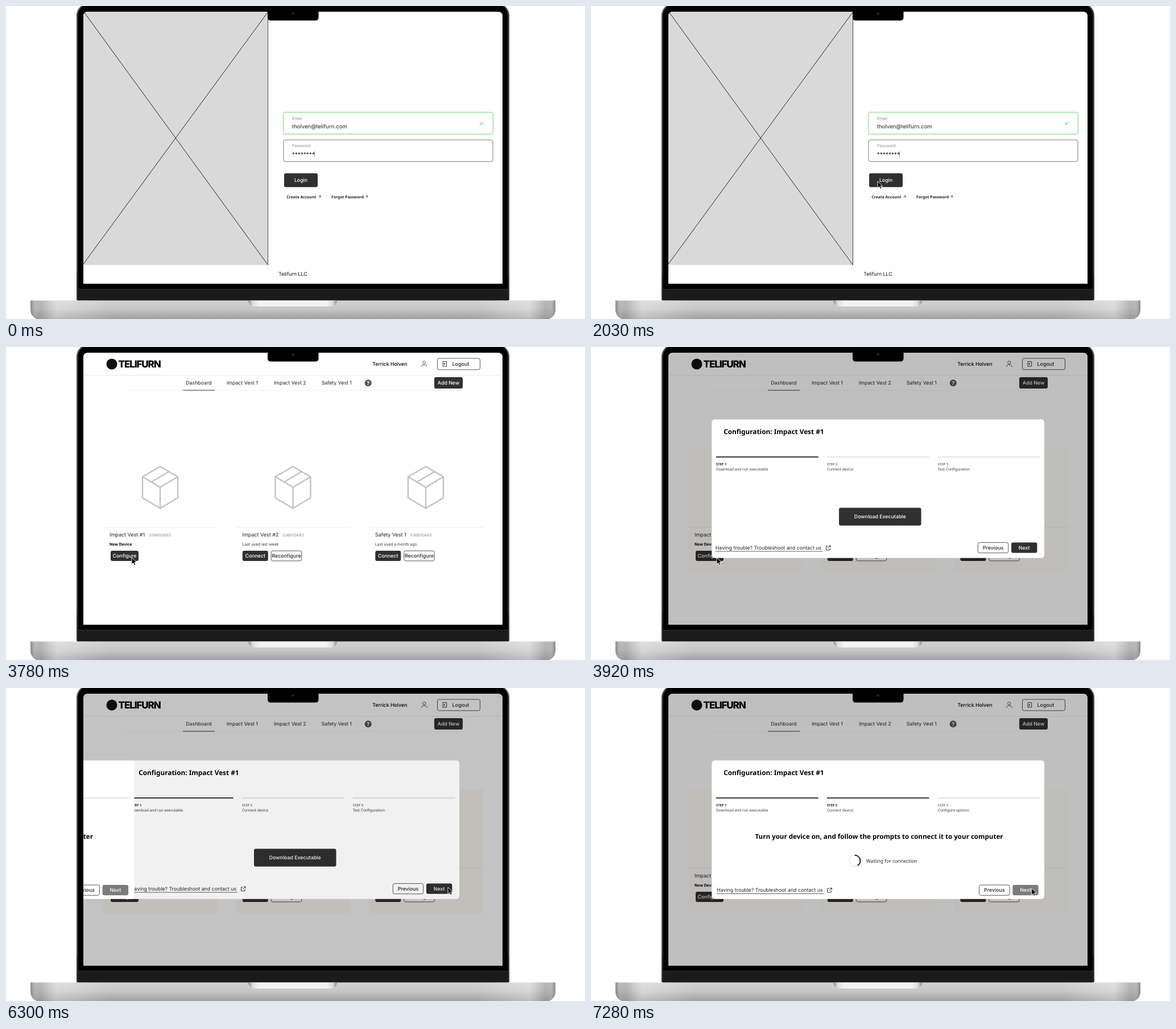
Animation, 1018 px wide and 550 px high, one loop 8000 ms. Source, as an HTML page:

```html
<!DOCTYPE html>
<html lang="en">
<head>
<meta charset="utf-8">
<title>Device setup</title>
<style>
  html, body { margin: 0; width: 100%; height: 100%; overflow: hidden; background: #fff; }
  svg { display: block; width: 100vw; height: 100vh; font-family: Inter, sans-serif; text-rendering: geometricPrecision; }
  .noto { font-family: "Noto Sans", sans-serif; }
</style>
</head>
<body>
<svg id="stage" viewBox="0 0 1018 550" xmlns="http://www.w3.org/2000/svg"></svg>
<script>
const INK = '#303030';
const LOOP = 8000, STEP = 70;

const rect = (x, y, x2, y2, fill, extra = '') =>
  `<rect x="${x}" y="${y}" width="${x2 - x}" height="${y2 - y}" fill="${fill}" ${extra}/>`;
const text = (x, y, str, size = 8.8, extra = '') =>
  `<text x="${x}" y="${y}" font-size="${size}" ${extra}>${str}</text>`;
const noto = (x, y, str, size, extra = '') => text(x, y, str, size, `class="noto" ${extra}`);
const path = (d, stroke = INK, width = 1, extra = '') =>
  `<path d="${d}" fill="none" stroke="${stroke}" stroke-width="${width}" ${extra}/>`;

function button(x, y, x2, y2, label, style = 'dark') {
  const outlined = style === 'outline';
  const fill = { dark: INK, outline: '#fff', off: '#7b7b7b' }[style];
  const edge = outlined ? 'stroke="#444" stroke-width=".9"' : '';
  return rect(x, y, x2, y2, fill, `rx="3" ${edge}`) +
    text((x + x2) / 2, (y + y2) / 2 + 3.2, label, 8.8,
      `text-anchor="middle" font-weight="500" fill="${outlined ? '#222' : '#fff'}"`);
}

function laptop() {
  return rect(124, -5, 885, 517.5, '#48484a', 'rx="22"') +
    rect(124, 470, 885, 517.5, '#3a3a3c', 'rx="2"') +
    rect(126.5, -3, 882.5, 517, '#000', 'rx="20"') +
    rect(126, 497.5, 883, 517.5, '#1b1b1c') +
    path('M126 497.5H883', '#3a3a3a', .8) +
    `<path d="M43 517.5H966V532Q966 552 942 552H67Q43 552 43 532Z" fill="url(#metal)"/>
     <path d="M43 517.5H966V532Q966 552 942 552H67Q43 552 43 532Z" fill="url(#sides)"/>
     <path d="M426 517.5H582Q581 528 569 528H439Q427 528 426 517.5Z" fill="url(#lip)"/>`;
}

function login() {
  const label = 'fill="#8a8a8a"', link = 'font-weight="600" fill="#222"';
  const arrow = x => path(`M${x} 337.2L${x + 3.6} 333.6M${x + .6} 333.6H${x + 3.6}V336.6`, '#333', .8);
  return rect(136, 10, 873, 488, '#fff') +
    rect(136, 10, 460.5, 455, '#d9d9d9') +
    path('M137 10.5L460.5 455M460.5 10.5L136 453.5', '#111', .9) +
    path('M460.5 10V455', '#333', .9) +
    rect(488, 187, 856, 225, '#fff', 'rx="3" stroke="#86dc86" filter="url(#glow)"') +
    text(503, 200, 'Email', 7, label) +
    text(502.8, 214.8, 'tholven@telifurn.com', 9.6, 'fill="#222"') +
    path('M833.2 206L835.2 208L839.2 203.8', '#55c05a', 1.1) +
    rect(488, 235.3, 856, 273.3, '#fff', 'rx="3" stroke="#7d7d7d"') +
    text(503, 248.4, 'Password', 7, label) +
    text(502.8, 263.6, '********', 9.6, 'fill="#222" font-weight="500"') +
    path('M542.3 255.5V264', '#333', .8) +
    button(489, 294, 548, 318.3, 'Login') +
    noto(493.2, 337.8, 'Create Account', 6.85, link) + arrow(549.5) +
    noto(572, 337.8, 'Forgot Password', 6.85, link) + arrow(632) +
    text(504.5, 473.7, 'Telifurn LLC', 8.9, 'text-anchor="middle" fill="#111"');
}

function card(x, name, status, isNew) {
  const box = x + 100, left = x + 11, tone = isNew ? 'font-weight="700"' : 'fill="#333"';
  const serial = { 171: 251.5, 404.5: 486, 638: 710.5 }[x];
  const cube = 'M0-36.5L31-18.5V18.5L0 37L-31 18.5V-18.5ZM-31-18.5L0 0L31-18.5M0 0V37M-15.5-9.2L15.5-27.5';
  const buttons = isNew
    ? button(184, 358, 233, 376, 'Configure')
    : button(left + .3, 358, left + 45.3, 376, 'Connect') +
      button(left + 50.8, 358.2, left + 104.2, 375.8, 'Reconfigure', 'outline');
  return rect(x, 178, x + 201, 395, '#fff', 'class="card"') +
    `<g transform="translate(${box} 246.5)">${path(cube, '#c2c2c2', 2.4, 'stroke-linejoin="round"')}</g>` +
    path(`M${x} 317H${x + 201}`, '#ececec') +
    text(left, 333, name, 9, 'fill="#222"') +
    text(serial, 332.8, 'S36610AB3', 6.9, 'fill="#888"') +
    text(left, 349, status, 6.85, tone) + buttons;
}

function dashboard() {
  const nav = [[316.3, 'Dashboard'], [388, 'Impact Vest 1'], [471, 'Impact Vest 2'], [554.7, 'Safety Vest 1']];
  return rect(136, 10, 873, 488, '#fff') +
    path('M136 49.8H873', '#ebebeb') + path('M208 76.5H802', '#f3f3f3') +
    '<circle cx="186" cy="30" r="9.5" fill="#111"/>' +
    text(197.5, 36, 'TELIFURN', 17, 'font-weight="800" letter-spacing="-1.1"') +
    text(644.2, 33, 'Terrick Holven', 8.8, 'font-weight="500"') +
    '<circle cx="735.3" cy="27.3" r="2.6" fill="none" stroke="#444" stroke-width=".9"/>' +
    path('M730.6 35Q730.6 31 735.3 31Q740 31 740 35', '#444', .9) +
    rect(758.5, 20, 833.5, 39.8, '#fff', 'rx="3" stroke="#444" stroke-width=".9"') +
    path('M768 28V25.6H774.6V33.8H768V31.4M766.6 29.7H771.6M769.8 27.9L771.6 29.7L769.8 31.5', '#222', .9) +
    text(784.6, 32.9, 'Logout', 8.9, 'font-weight="500" fill="#222"') +
    nav.map(([x, s]) => text(x, 66.2, s, 8.75, 'fill="#222"')).join('') +
    path('M311 76H367', '#333', 1.1) +
    '<circle cx="636.7" cy="63.2" r="6" fill="#555"/>' +
    text(636.7, 66.8, '?', 9.6, 'text-anchor="middle" font-weight="700" fill="#fff"') +
    button(753, 53, 803, 73, 'Add New') +
    card(171, 'Impact Vest #1', 'New Device', true) +
    card(404.5, 'Impact Vest #2', 'Last used last week') +
    card(638, 'Safety Vest 1', 'Last used a month ago');
}

function modal(steps, active, body, nextStyle, shift) {
  const bars = steps.map((label, i) => {
    const x = 220 + i * 194.9, on = i < active;
    return path(`M${x} 193.2H${x + 179.6}`, on ? INK : '#e3e3e3', 2) +
      noto(x, 208.3, `STEP ${i + 1}`, 5.8, `font-weight="600" fill="${on ? '#222' : '#777'}"`) +
      noto(x, 217.4, label, 6.5, 'fill="#333"');
  }).join('');
  return rect(212.3, 127.3, 797, 370.8, '#fff', 'rx="5"') +
    noto(233.3, 153.2, 'Configuration: Impact Vest #1', 11.8, 'font-weight="700"') + bars + body +
    `<g transform="translate(${shift})">` +
    text(218.8, 355.8, 'Having trouble? Troubleshoot and contact us', 8.8, 'fill="#222"') +
    path('M218.8 359H407', '#333', .8) +
    path('M416.5 350H413.4V356.6H420V353.5M417.6 349H421V352.4M421 349L416.4 353.6', '#222', .9) +
    button(680.3, 343.6, 733.7, 361.8, 'Previous', 'outline') +
    button(739, 343.4, 784.4, 361.8, 'Next', nextStyle) + '</g>';
}

const download = button(436, 282.4, 580.5, 313.8, 'Download Executable');
const waiting =
  noto(506.5, 265.2, 'Turn your device on, and follow the prompts to connect it to your computer', 11.6,
    'font-weight="600" text-anchor="middle"') +
  '<circle cx="463.5" cy="303.6" r="9.8" fill="none" stroke="#e2e2e2" stroke-width="1.1"/>' +
  path('M463.5 293.8A9.8 9.8 0 0 1 468.8 311.9', '#222', 2.1) +
  noto(483.8, 306.8, 'Waiting for connection', 8.45, 'fill="#222"');

const shade = id => rect(136, 10, 873, 488, '#000', `id="${id}"`);

document.getElementById('stage').innerHTML = `
<defs>
  <clipPath id="screen"><path d="M136 488V18Q136 10 144 10H865Q873 10 873 18V488Z"/></clipPath>
  <filter id="glow" x="-5%" y="-30%" width="110%" height="160%">
    <feDropShadow dx="0" dy="0" stdDeviation="1.8" flood-color="#7be07b" flood-opacity=".6"/>
  </filter>
  <linearGradient id="metal" x2="0" y2="1">
    <stop stop-color="#d2d2d2"/><stop offset=".45" stop-color="#c6c6c6"/><stop offset="1" stop-color="#9c9c9c"/>
  </linearGradient>
  <linearGradient id="sides">
    <stop stop-color="#777" stop-opacity=".8"/><stop offset=".008" stop-color="#999" stop-opacity=".4"/>
    <stop offset=".02" stop-color="#888" stop-opacity=".35"/><stop offset=".05" stop-color="#fff" stop-opacity=".3"/>
    <stop offset=".15" stop-color="#fff" stop-opacity="0"/><stop offset=".85" stop-color="#fff" stop-opacity="0"/>
    <stop offset=".95" stop-color="#fff" stop-opacity=".3"/><stop offset=".98" stop-color="#888" stop-opacity=".35"/>
    <stop offset=".992" stop-color="#999" stop-opacity=".4"/><stop offset="1" stop-color="#777" stop-opacity=".8"/>
  </linearGradient>
  <linearGradient id="lip">
    <stop stop-color="#8a8a8a"/><stop offset=".05" stop-color="#dedede"/><stop offset=".12" stop-color="#f3f3f3"/>
    <stop offset=".88" stop-color="#f3f3f3"/><stop offset=".95" stop-color="#dedede"/><stop offset="1" stop-color="#8a8a8a"/>
  </linearGradient>
</defs>
${rect(0, 0, 1018, 550, '#fff')}
${laptop()}
<g clip-path="url(#screen)">
  <g id="login">${login()}</g>
  <g id="dash">${dashboard()}</g>
  ${shade('shadeA')}
  <g id="first">${modal(['Download and run executable', 'Connect device', 'Test Configuration'], 1, download, 'dark', '0 0')}</g>
  ${shade('shadeB')}
  <g id="second">${modal(['Download and run executable', 'Connect device', 'Configure options'], 2, waiting, 'off', '2.3 2.5')}</g>
</g>
<path d="M460 9H549.5V20Q549.5 25.5 544 25.5H465.5Q460 25.5 460 20Z"/>
<circle cx="504.5" cy="13.2" r="2.4" fill="#1d1d20"/><circle cx="504.5" cy="13.2" r="1" fill="#333338"/>
<circle id="ripple" fill="#000"/>
<path id="cursor" d="M0 0V11.9L2.8 9.3L4.6 13.5L6.7 12.6L4.9 8.5H8.7Z" fill="#000" stroke="#fff" stroke-width=".9"/>`;

const el = {};
for (const id of ['login', 'dash', 'shadeA', 'first', 'shadeB', 'second', 'ripple', 'cursor'])
  el[id] = document.getElementById(id);
const cards = document.querySelectorAll('.card');

const clamp = v => Math.min(1, Math.max(0, v));
const ease = u => (1 - Math.cos(Math.PI * clamp(u))) / 2;
const show = (node, on) => node.setAttribute('visibility', on ? 'visible' : 'hidden');

// start, end, x, y
const moves = [
  [70, 840, 504, 308], [2590, 2800, 506, 310], [2940, 3500, 221, 370], [4130, 4550, 423, 308],
  [4760, 4970, 555, 308], [5320, 5950, 777, 350], [7070, 7280, 774.5, 352]
];
// start, duration, radius
const clicks = [[880, 380, 18], [3480, 300, 25], [6100, 200, 25]];

function pointer(t) {
  let x = 600, y = 500;
  for (const [a, b, tx, ty] of moves) {
    const p = ease((t - a) / (b - a));
    x += (tx - x) * p;
    y += (ty - y) * p;
  }
  return [x, y];
}

function draw(t) {
  const slide = t >= 6580 ? 1 : ease((t - 6158) / 452);
  const open = t >= 3920, sliding = slide > .001 && slide < 1;
  show(el.login, t < 2100);
  show(el.dash, t >= 2100);
  show(el.first, open && slide < 1);
  show(el.second, t >= 6160);
  el.shadeA.setAttribute('opacity', open ? .25 * (1 - slide) : 0);
  el.shadeB.setAttribute('opacity', .25 * slide);
  el.second.setAttribute('transform', `translate(${-737 * (1 - slide)} 0)`);
  cards.forEach(c => c.setAttribute('fill', sliding ? '#fdf8f2' : open ? '#fefcf8' : '#fff'));

  const [x, y] = pointer(t);
  show(el.cursor, t >= 70);
  el.cursor.setAttribute('transform', `translate(${x} ${y})`);

  const click = clicks.find(([a, d]) => t >= a && t < a + d);
  show(el.ripple, click);
  if (click) {
    const u = (t - click[0]) / click[1];
    el.ripple.setAttribute('cx', x);
    el.ripple.setAttribute('cy', y);
    el.ripple.setAttribute('r', click[2] * Math.sqrt(u));
    el.ripple.setAttribute('opacity', .2 * (1 - u));
  }
}

const start = performance.now();
function tick() {
  const t = (performance.now() - start) % LOOP;
  draw(Math.floor(t / STEP) * STEP);
  requestAnimationFrame(tick);
}
tick();
</script>
</body>
</html>
```
